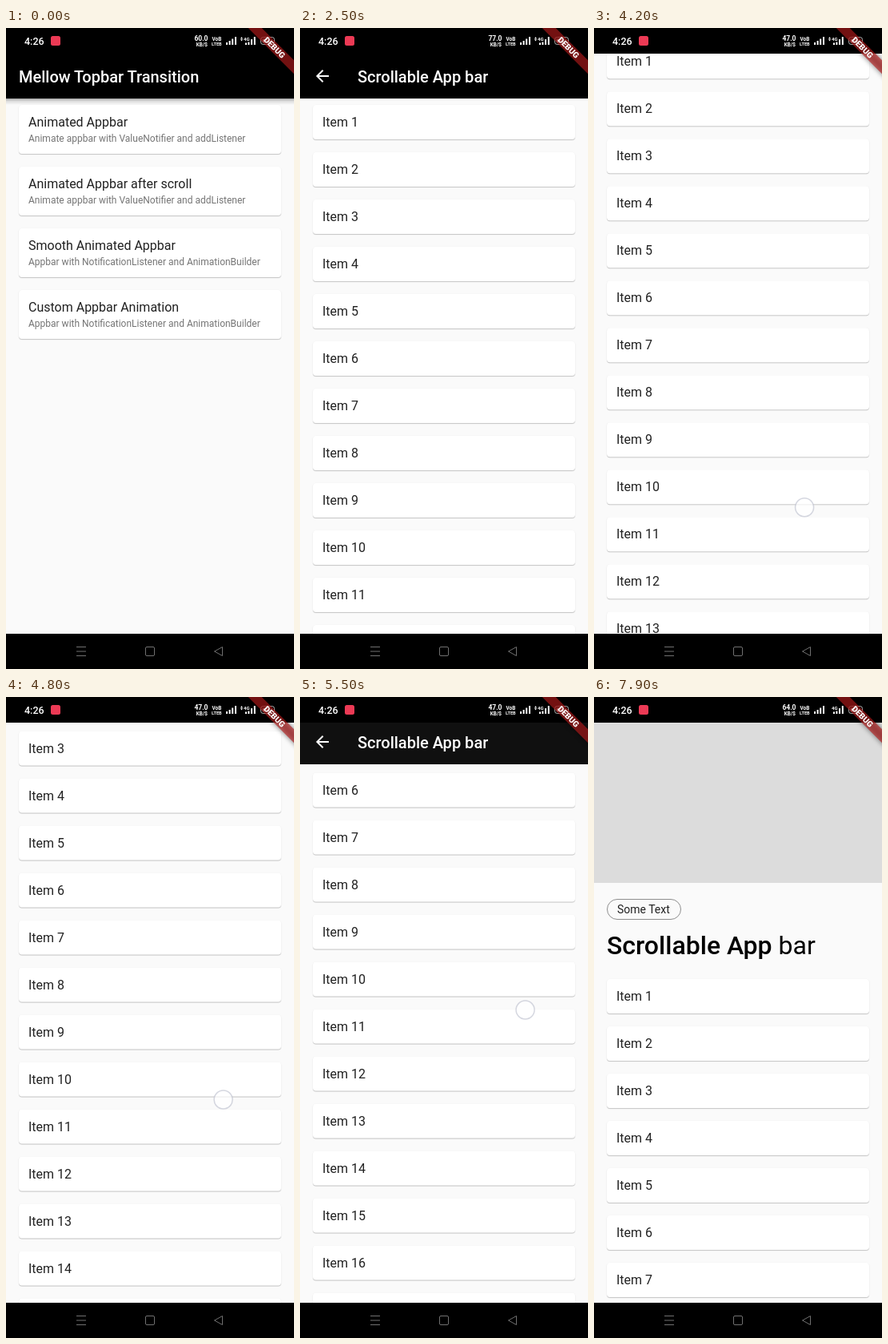
Recreate the animation shown at these times as an HTML page. Size 360 by 800 pixels, loop 8000 ms.

```html
<!DOCTYPE html>
<html lang="en">
<head>
<meta charset="utf-8">
<title>App bar demo</title>
<style>
html, body { margin: 0; width: 100%; height: 100%; overflow: hidden; background: #000; }
svg { display: block; width: 100%; height: 100%; }
text { font-family: Roboto, sans-serif; }
.title { font-size: 20px; font-weight: 500; fill: #fff; }
.item { font-size: 16px; fill: #212121; }
.sub { font-size: 12px; fill: #757575; }
.tiny { font-weight: 700; fill: #fff; }
</style>
</head>
<body>
<svg viewBox="0 0 360 800">
  <defs>
    <linearGradient id="shade" x1="0" y1="0" x2="0" y2="1">
      <stop offset="0" stop-opacity=".34"/>
      <stop offset=".4" stop-opacity=".12"/>
      <stop offset="1" stop-opacity="0"/>
    </linearGradient>
    <filter id="blur" x="-20%" y="-80%" width="140%" height="260%">
      <feGaussianBlur stdDeviation="3"/>
    </filter>
  </defs>

  <rect width="360" height="800" fill="#fafafa"/>

  <g id="home">
    <g id="menu"></g>
    <rect y="88" width="360" height="8" fill="url(#shade)"/>
    <rect width="360" height="88"/>
    <text class="title" x="16" y="68">Mellow Topbar Transition</text>
  </g>

  <g id="scroller">
    <g id="list"></g>
    <g id="bar">
      <rect id="barFill" y="32" width="360" height="56"/>
      <path transform="translate(16 48)" fill="#fff" d="M20 11H7.83l5.59-5.59L12 4l-8 8 8 8 1.41-1.41L7.83 13H20z"/>
      <text class="title" x="72" y="68">Scrollable App bar</text>
    </g>
  </g>

  <g id="detail">
    <rect y="32" width="360" height="200" fill="#dcdcdc"/>
    <rect x="16.5" y="252.5" width="92" height="25" rx="12.5" fill="none" stroke="#8e8e8e"/>
    <text x="29" y="270" font-size="14" fill="#212121">Some Text</text>
    <text x="16" y="320.5" font-size="32" fill="#000"><tspan font-weight="500">Scrollable App</tspan> bar</text>
    <g id="detailList"></g>
  </g>

  <rect width="360" height="32"/>
  <g id="status">
    <text x="23" y="20.5" font-size="12.5" font-weight="500" fill="#fff">4:26</text>
    <rect x="56" y="10" width="12" height="12" rx="2.5" fill="#ec3a55"/>
    <text id="speed" class="tiny" x="252.5" y="16" font-size="8.5" text-anchor="end"></text>
    <text class="tiny" x="252" y="22.5" font-size="6.3" text-anchor="end">KB/S</text>
    <text class="tiny" x="257.5" y="15.5" font-size="6.4">VoB</text>
    <text class="tiny" x="257" y="21.5" font-size="5.6">LTEB</text>
    <path fill="#fff" d="M275 18h2v3h-2zM278.6 16h2v5h-2zM282.2 13.5h2v7.5h-2zM286 11h2v10h-2z"/>
    <path id="up" fill="#fff" d="M293 13.4l1.5-2.4 1.5 2.4z"/>
    <path id="down" fill="#fff" d="M293 14.2h3l-1.5 2.3z"/>
    <text class="tiny" x="297" y="16" font-size="6">4G</text>
    <path fill="#fff" d="M299 18.5h2v2.5h-2zM302.4 17.5h2v3.5h-2zM306 14h2v7h-2zM309.8 11h2v10h-2z"/>
    <rect x="318.5" y="11.5" width="17" height="9" rx="3" fill="none" stroke="#d8d8d8"/>
    <rect x="320.5" y="13.5" width="9" height="5" rx="1.5" fill="#d8d8d8"/>
  </g>

  <g transform="translate(360 0) rotate(45)">
    <rect x="-50" y="28.5" width="100" height="12" opacity=".5" filter="url(#blur)"/>
    <rect x="-50" y="28.5" width="100" height="12" fill="#b71c1c" fill-opacity=".63"/>
    <text y="38.1" font-size="10.2" font-weight="900" fill="#fff" text-anchor="middle">DEBUG</text>
  </g>

  <rect y="756" width="360" height="44"/>
  <g fill="none" stroke="#707070">
    <path d="M88 772.5h12M88 778h12M88 783.5h12"/>
    <rect x="174.5" y="772.5" width="11" height="11" rx="1.5"/>
    <path d="M260.5 778l10-5.5v11z" stroke-linejoin="round"/>
  </g>

  <g id="touch">
    <circle r="11.5" fill="#fff" fill-opacity=".68" stroke="#b9bccb" stroke-opacity=".6" stroke-width="1.5"/>
  </g>
</svg>
<script>
const LOOP = 8000, STEP = 100, BAR = 56, TURN = 5100;
const $ = id => document.getElementById(id);

const card = (y, h, body) => `<g transform="translate(16 ${y})">
  <rect x="-.6" y="-.2" width="329.2" height="${h + 1.8}" rx="4.5" fill-opacity=".05"/>
  <rect y="1" width="328" height="${h}" rx="4" fill-opacity=".15"/>
  <rect width="328" height="${h}" rx="4" fill="#fff"/>${body}</g>`;

const items = (top, count) => Array.from({ length: count }, (_, i) =>
  card(top + i * 59, 43, `<text class="item" x="12" y="27">Item ${i + 1}</text>`)).join('');

const notifier = 'Animate appbar with ValueNotifier and addListener';
const builder = 'Appbar with NotificationListener and AnimationBuilder';
$('menu').innerHTML = [
  ['Animated Appbar', notifier],
  ['Animated Appbar after scroll', notifier],
  ['Smooth Animated Appbar', builder],
  ['Custom Appbar Animation', builder]
].map(([name, note], i) => card(96 + i * 77, 61,
  `<text class="item" x="12" y="27">${name}</text><text class="sub" x="12" y="46">${note}</text>`)).join('');
$('list').innerHTML = items(96, 20);
$('detailList').innerHTML = items(352, 7);

// Scroll distance over time, joined by a monotone cubic
const keys = [[3200, 0], [3700, 22.5], [4100, 64], [4500, 116], [4800, 171.5],
  [TURN, 348.5], [5500, 296.5], [5900, 0]];
const peak = 348.5;
const slope = i => (keys[i + 1][1] - keys[i][1]) / (keys[i + 1][0] - keys[i][0]);
const tangent = i => {
  if (i === 0 || i === keys.length - 1) return 0;
  const a = slope(i - 1), b = slope(i);
  return a * b <= 0 ? 0 : 2 * a * b / (a + b);
};

function scrollAt(t) {
  if (t <= keys[0][0] || t >= keys[keys.length - 1][0]) return 0;
  const i = keys.findIndex(k => k[0] > t) - 1;
  const [t0, v0] = keys[i], [t1, v1] = keys[i + 1];
  const d = t1 - t0, u = (t - t0) / d, w = 1 - u;
  return w * w * (1 + 2 * u) * v0 + u * u * (3 - 2 * u) * v1
    + d * u * w * (w * tangent(i) - u * tangent(i + 1));
}

const clamp = (v, lo, hi) => Math.min(hi, Math.max(lo, v));
const within = (t, a, b) => t >= a && t < b;
const show = (id, on) => $(id).setAttribute('display', on ? 'inline' : 'none');
const move = (id, x, y) => $(id).setAttribute('transform', `translate(${x} ${y})`);

function touchAt(t, scroll) {
  if (within(t, 1800, 1900)) return [305, 128];
  if (within(t, 3300, 5800)) {
    const lead = 13 * clamp((t - TURN) / 400, 0, 1);
    return [256 + (t - 3700) * 0.0142, 674 - scroll + lead];
  }
  if (within(t, 6500, 6800)) return [117, 54];
  if (within(t, 7300, 7600)) return [136, 202];
  return null;
}

function draw(t) {
  const scrolling = within(t, 2500, 6900), detail = t >= 7900;
  show('home', !scrolling && !detail);
  show('scroller', scrolling);
  show('detail', detail);

  const scroll = scrollAt(t);
  const hidden = clamp(t < TURN ? scroll - 6.5 : BAR - (peak - scroll), 0, BAR);
  const grey = Math.round(hidden * 4.1);
  move('list', 0, -scroll);
  move('bar', 0, -hidden);
  $('barFill').setAttribute('fill', `rgb(${grey},${grey},${grey})`);

  $('speed').textContent = t < 1800 ? '60.0' : t < 4200 ? '77.0' : t < 6500 ? '47.0' : '64.0';
  show('up', t < 7900);
  show('down', t < 500 || within(t, 2200, 7900));

  const touch = touchAt(t, scroll);
  show('touch', touch);
  if (touch) move('touch', ...touch);
}

const start = performance.now();
function tick() {
  const t = (performance.now() - start) % LOOP;
  draw(Math.floor(t / STEP) * STEP);
  requestAnimationFrame(tick);
}
tick();
</script>
</body>
</html>
```
